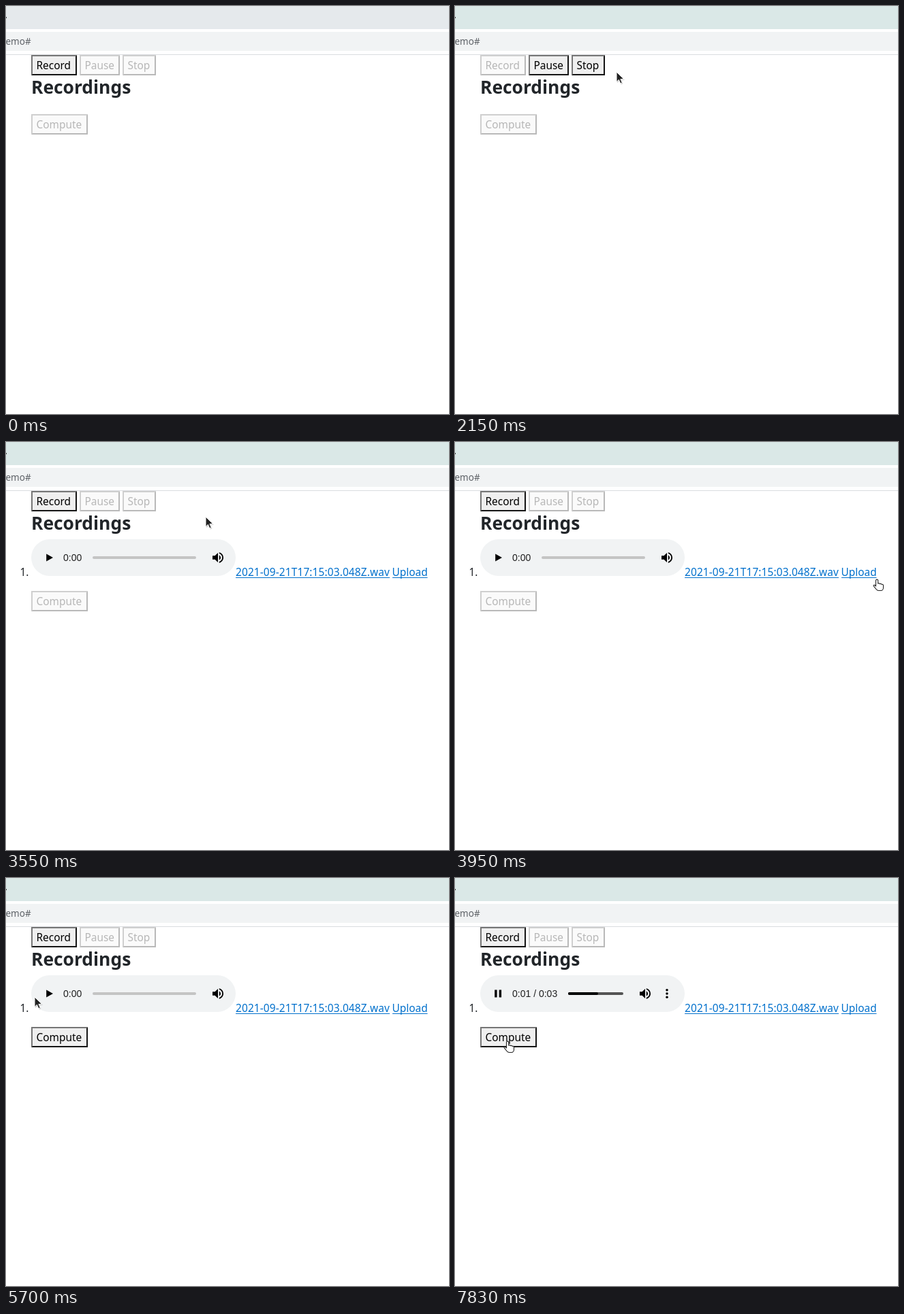
An HTML page for the animation above (8 s loop, 650 by 600 pixels).

```html
<!DOCTYPE html>
<html lang="en">
<head>
<meta charset="utf-8">
<title>Recorder demo</title>
<style>
html, body { margin: 0; width: 100%; height: 100%; overflow: hidden; background: #fff; }
svg { display: block; width: 650px; height: 600px; }
text { font: 15.4px "Noto Sans", "Open Sans", sans-serif; fill: #212529; }
.url { font-size: 13.5px; fill: #5f6368; }
.head { font-size: 26.4px; font-weight: 600; }
.time { font: 14px "Liberation Sans", Arial, sans-serif; fill: #202020; }
.link { fill: #0070cc; }
.file { letter-spacing: .14px; }
.btn .face { fill: #efefef; }
.btn .lit { fill: #767676; }
.btn .dark { fill: #151515; }
.btn text { fill: #000; }
.btn.off .face { fill: #fafafa; }
.btn.off .lit { fill: #cfcfcf; }
.btn.off .dark { fill: #b9b9b9; }
.btn.off text { fill: #b7b7b7; }
</style>
</head>
<body>
<svg viewBox="0 0 650 600">
  <rect width="650" height="600" fill="#fff"/>
  <rect id="tabs" width="650" height="34"/>
  <rect y="16" width="1" height="2" fill="#444"/>
  <rect y="38" width="650" height="28" fill="#f1f3f4"/>
  <rect y="71" width="650" height="1" fill="#dadce0"/>
  <text class="url" x="-.5" y="57">emo#</text>
  <g id="buttons"></g>
  <text class="head" x="37" y="129">Recordings</text>

  <g id="row">
    <text x="20.5" y="197">1.</text>
    <rect x="37" y="143" width="300" height="54" rx="27" fill="#f1f3f4"/>
    <path id="play" d="M59.2 164.6V175.6L69 170.1Z"/>
    <path id="pause" d="M58.2 164.6h3.4v11h-3.4zM64.7 164.6h3.4v11h-3.4z"/>
    <text id="time" class="time" x="84" y="175"></text>
    <rect id="track" y="168" height="4" rx="2"/>
    <rect id="played" x="166" y="168" height="4" rx="2"/>
    <path id="volume" d="M3 9v6h4l5 5V4L7 9H3zm13.5 3c0-1.77-1.02-3.29-2.5-4.03v8.05c1.48-.73 2.5-2.25 2.5-4.02zM14 3.23v2.06c2.89.86 5 3.54 5 6.71s-2.11 5.85-5 6.71v2.06c4.01-.91 7-4.49 7-8.77s-2.99-7.86-7-8.77z"/>
    <g id="menu">
      <circle cx="311" cy="164.8" r="1.8"/>
      <circle cx="311" cy="170" r="1.8"/>
      <circle cx="311" cy="175.2" r="1.8"/>
    </g>
    <text class="link file" x="337" y="197">2021-09-21T17:15:03.048Z.wav</text>
    <text class="link" x="566.5" y="197">Upload</text>
    <path d="M337 199h226v1h-226zM567 199h51.5v1h-51.5z" fill="#0070cc"/>
  </g>

  <g id="cursor">
    <g id="arrow">
      <path d="M1 1.5V16L4.4 13 6.8 18.4 9.5 17.2 7 12H12Z" fill="#000" opacity=".18"/>
      <path d="M0 0V14.5L3.4 11.4 5.8 17 8.3 16 5.9 10.5H10.8Z" fill="#222" stroke="#fff" stroke-width="1"/>
    </g>
    <g id="hand">
      <path id="palm" d="M-1.5 10V1.7a1.6 1.6 0 0 1 3.2 0V6.2c.6-.6 2.4-.5 2.7.5 .8-.6 2.4-.3 2.6.7 1-.4 2.5 0 2.5 1.6V12c0 2.5-1.5 4.5-3.5 4.5H2.5c-1.5 0-2.5-.7-3.5-2l-3.7-4.6c-.6-1 .6-2.2 1.8-1.4z" fill="#fff" stroke="#222" stroke-width="1.1" stroke-linejoin="round"/>
    </g>
  </g>
</svg>
<script>
const LOOP = 8000;
const START = 360, STOP = 3370, READY = 5040, PLAY = 6170, LOADED = 6830;
const $ = id => document.getElementById(id);
const show = (id, on) => $(id).setAttribute('display', on ? 'inline' : 'none');
const set = (id, attrs) => {
  for (const key in attrs) $(id).setAttribute(key, attrs[key]);
};

// Outset button, 30px high, placed by its top left corner.
function button(id, label, w) {
  $('buttons').insertAdjacentHTML('beforeend', `<g id="${id}" class="btn">
    <rect class="face" width="${w}" height="30"/>
    <path class="lit" d="M0 30V0H${w}L${w - 2} 2H2V28Z"/>
    <path class="dark" d="M0 30H${w}V0L${w - 2} 2V28H2Z"/>
    <text x="7.5" y="21">${label}</text></g>`);
}
button('record', 'Record', 67);
button('hold', 'Pause', 59);
button('stop', 'Stop', 49);
button('compute', 'Compute', 83);

function place(id, x, y, on) {
  set(id, { transform: `translate(${x} ${y})`, class: on ? 'btn' : 'btn off' });
}

// Pointer moves: first change, last change, steps, end point.
const MOVES = [
  [360, 880, 10, 348, 147],
  [1040, 1160, 4, 299, 122],
  [1420, 1510, 3, 293, 122],
  [2010, 2150, 4, 237, 97],
  [2430, 2900, 9, 198, 83],
  [3370, 3950, 13, 619, 202],
  [4000, 4000, 1, 614, 196],
  [4210, 4300, 3, 615, 190],
  [5040, 5600, 12, 8, 183],
  [5650, 5700, 2, 42, 175],
  [5750, 5810, 2, 45, 173],
  [5850, 5970, 4, 57, 165],
  [6170, 6280, 3, 49, 186],
  [6330, 6500, 4, 70, 249],
  [6550, 6700, 4, 77, 240]
];

function pointer(t) {
  let x = -14, y = 100;
  for (const [from, to, steps, ex, ey] of MOVES) {
    if (t < from) break;
    const gap = (to - from) / Math.max(1, steps - 1);
    const done = t >= to ? steps : Math.floor((t - from) / gap) + 1;
    let k = Math.min(1, done / steps);
    if (steps > 6) k = k * k * (3 - 2 * k);
    x += (ex - x) * k;
    y += (ey - y) * k;
  }
  return [x, y];
}

const inside = (x, y, l, top, r, b) => x >= l && x <= r && y >= top && y <= b;

function clickable(t, x, y) {
  if (t < STOP) return t >= START && inside(x, y, 108, 72, 220, 101);
  return inside(x, y, 37, 72, 104, 101) ||
    inside(x, y, 337, 182, 563, 202) || inside(x, y, 566, 182, 619, 202) ||
    (t >= READY && inside(x, y, 37, 219, 120, 248));
}

function draw(t) {
  const live = t >= START && t < STOP;
  const saved = t >= STOP, loaded = t >= LOADED;
  set('tabs', { fill: t < START ? '#e5e9ec' : '#dae8e7' });
  place('record', 37, 72, !live);
  place('hold', 108, 72, live);
  place('stop', 171, 72, live);
  place('compute', 37, saved ? 219 : 159, t >= READY);

  show('row', saved);
  show('play', t < PLAY);
  show('pause', t >= PLAY);
  show('menu', loaded);
  show('played', loaded);
  $('time').textContent = !loaded ? '0:00' : t < 7340 ? '0:00 / 0:03' : '0:01 / 0:03';
  set('track', loaded
    ? { x: 166, width: 81, fill: '#545454' }
    : { x: 127, width: 152, fill: '#c4c4c4' });
  const ticks = [7080, 7340, 7590, 7830].filter(at => t >= at).length;
  set('played', { width: 21 + Math.round(ticks * 5.75) });
  set('volume', { transform: `translate(${loaded ? 279 : 311} 170) scale(.889) translate(-12 -12)` });

  const [x, y] = pointer(t);
  const over = clickable(t, x, y);
  show('cursor', t >= START);
  show('hand', over);
  show('arrow', !over);
  set('cursor', { transform: `translate(${Math.round(x)} ${Math.round(y)})` });
}

const begin = performance.now();
function frame() {
  draw((performance.now() - begin) % LOOP);
  requestAnimationFrame(frame);
}
frame();
</script>
</body>
</html>
```
